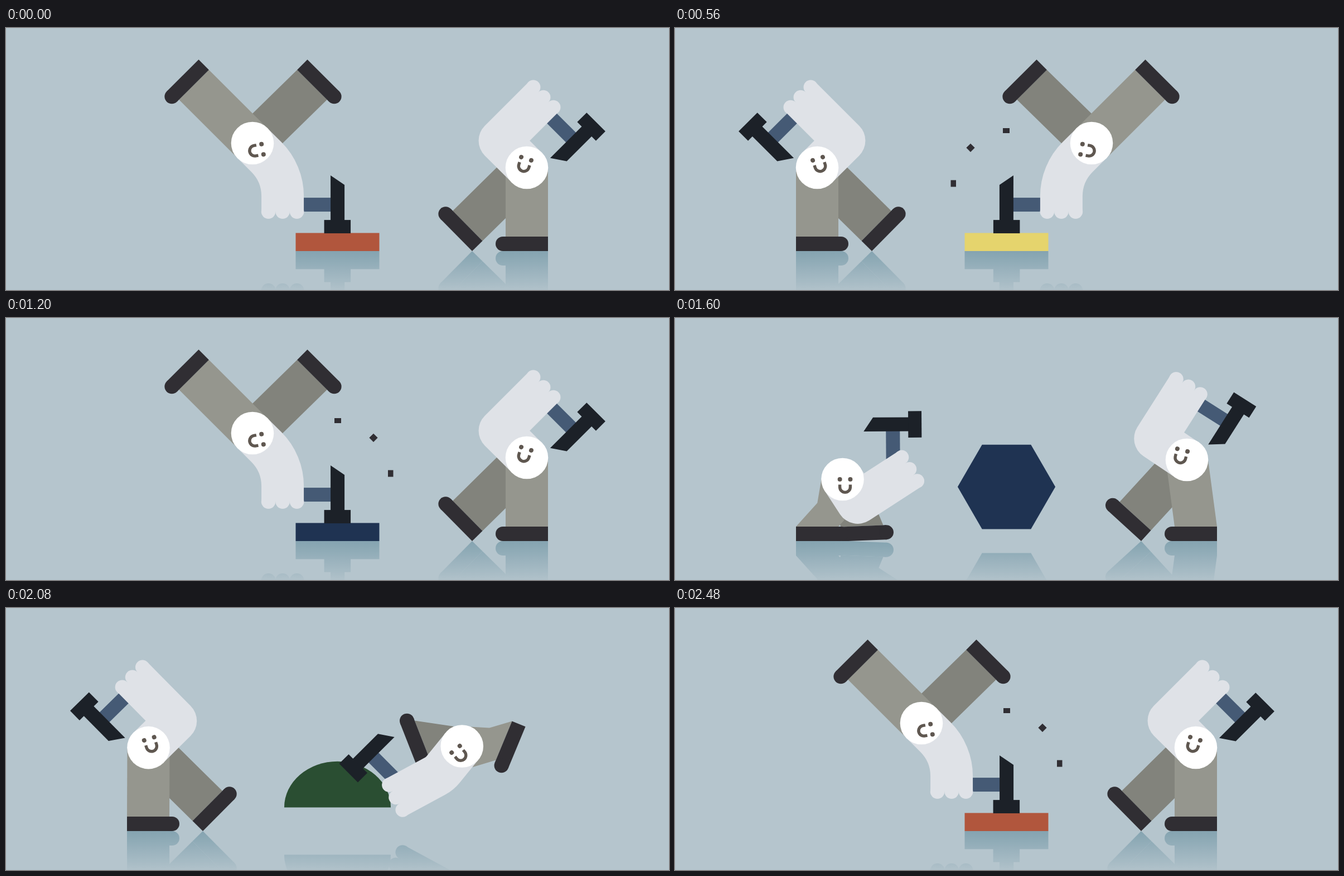
Recreate the animation shown at these times as an HTML page with a canvas. Size 1189 by 471 pixels, loop 2560 ms.

```html
<!DOCTYPE html>
<html>
<head>
<meta charset="utf-8">
<style>
html, body { margin: 0; width: 100%; height: 100%; overflow: hidden; background: #b5c5cd; }
canvas { display: block; }
</style>
</head>
<body>
<canvas id="stage" width="1189" height="471"></canvas>
<script>
const W = 1189, H = 471, FLOOR = 401, STEP = 80, FRAMES = 32;
const HALF = 38, SHOE_H = 26, HEEL = 353;
const BG = '#b5c5cd', SHOE = '#302e33', SKIN = '#dfe2e7', INK = '#5f5750';
const BLOCKS = ['#b1563d', '#e5d46d', '#1f3352', '#2a4e32'];

const ctx = document.getElementById('stage').getContext('2d');
const mirror = document.createElement('canvas');
mirror.width = W;
mirror.height = H;
const mctx = mirror.getContext('2d');
const fade = mctx.createLinearGradient(0, FLOOR, 0, 478);
fade.addColorStop(0, 'rgba(132,163,176,1)');
fade.addColorStop(1, 'rgba(132,163,176,0)');

const rad = d => d * Math.PI / 180;
const polar = (x, y, deg, r) => [x + r * Math.cos(rad(deg)), y + r * Math.sin(rad(deg))];
const lerp = (a, b, w) => a + (b - a) * w;

function mix(a, b, w) {
  const out = {};
  for (const k in a) out[k] = lerp(a[k], b[k], w);
  return out;
}

// Standing: front foot flat, back foot square to its leg and pivoting on its heel.
function stand(x, y, more) {
  const dx = x - HEEL, dy = y - FLOOR;
  const turn = Math.atan2(dy, dx) + Math.acos(HALF / Math.hypot(dx, dy));
  const c = Math.cos(turn), s = Math.sin(turn);
  return {
    x, y, frontX: 255, frontY: FLOOR - SHOE_H, front: 0,
    backX: HEEL + HALF * c + SHOE_H * s, backY: FLOOR + HALF * s - SHOE_H * c,
    back: turn * 180 / Math.PI, side: 1, knee: 0,
    upper: 68.5, fore: 110.5, round: 0, slip: -3.7, twist: 0, bend: -90, ...more
  };
}

const RAISED = stand(255, 251, { arm: -45, faceX: 1, faceY: -16, face: -18 });
const WINDUP = stand(271, 255, { arm: -34, bend: -88.4, faceX: 8, faceY: -17.5, face: -15 });
const CROUCH = stand(300.5, 290, {
  arm: 57, upper: 50, twist: 32.6, knee: 15.5, faceX: 4.5, faceY: 0, face: 0,
  backX: 335.5, backY: 374, back: -2.3
});
const HIT = stand(442, 207, {
  arm: 45, bend: 45, upper: 76.5, fore: 69, round: 99.5, slip: 0, faceX: 18, faceY: 11, face: 79,
  frontX: 337, frontY: 102, front: 135, backX: 549, backY: 102, back: -135, side: -1
});

function pose(p) {
  if (p < 4) return mix(HIT, CROUCH, p / 4);
  if (p < 8) return mix(CROUCH, RAISED, 1 - Math.pow((7 - Math.min(p, 7)) / 3, 9));
  if (p <= 12) return mix(RAISED, WINDUP, Math.pow((p - 8) / 4, 5));
  return mix(WINDUP, HIT, Math.min(1, Math.pow((p - 12) / 2.5, 1.8)));
}

function poly(g, pts) {
  g.beginPath();
  pts.forEach(([x, y]) => g.lineTo(x, y));
  g.fill();
}

function disc(g, x, y, r) {
  g.beginPath();
  g.arc(x, y, r, 0, 7);
  g.fill();
}

// Runs draw in a moved and turned frame.
function at(g, x, y, deg, draw) {
  g.save();
  g.translate(x, y);
  g.rotate(rad(deg));
  draw();
  g.restore();
}

function leg(g, fill, x, y, ax, ay, foot, side, knee) {
  const [vx, vy] = polar(0, 0, foot, HALF), k = knee / HALF;
  const joints = [[x, y], [(x + ax) / 2 + vx * k, (y + ay) / 2 + vy * k], [ax, ay]];
  const edge = s => joints.map(([jx, jy]) => [jx + s * vx, jy + s * vy]);
  g.fillStyle = fill;
  poly(g, [...edge(-1), ...edge(1).reverse()]);
  at(g, ax, ay, foot, () => {
    g.scale(side < 0 ? -1 : 1, 1);
    g.fillStyle = SHOE;
    g.fillRect(-HALF, 0, 81, SHOE_H);
    disc(g, 43, 13, 13);
  });
}

function hammer(g, slip, twist) {
  const gripX = -20, gripY = -31;
  at(g, slip + gripX, gripY, twist, () => {
    g.translate(-gripX, -gripY);
    g.fillStyle = '#455a75';
    g.fillRect(-25, -87, 25, 87);
    g.fillStyle = '#1c2128';
    poly(g, [[-65, -86], [16, -86], [16, -111], [-48, -111]]);
    g.fillRect(15, -122, 24, 47.5);
  });
}

function face(g, x, y, turn) {
  at(g, x, y, turn, () => {
    g.fillStyle = g.strokeStyle = INK;
    disc(g, -9.4, 0, 4);
    disc(g, 9.4, 0, 4);
    g.lineWidth = 5.4;
    g.beginPath();
    g.moveTo(-9.4, 9.5);
    g.arc(0, 14, 9.4, Math.PI, 0, true);
    g.lineTo(9.4, 9.5);
    g.stroke();
  });
}

function figure(g, p) {
  const q = pose(p), { x, y } = q, hand = q.arm + q.bend;
  const [ex, ey] = polar(x, y, q.arm, q.upper);
  const [px, py] = polar(ex, ey, hand, q.fore);
  const slack = Math.min(q.upper, q.fore) / (Math.abs(Math.tan(rad(q.bend) / 2)) || 0.01);

  leg(g, '#82837c', x, y, q.backX, q.backY, q.back, q.side, 0);
  leg(g, '#95968e', x, y, q.frontX, q.frontY, q.front, 1, q.knee);

  at(g, px, py, hand, () => {
    hammer(g, q.slip, q.twist);
    g.fillStyle = SKIN;
    for (const f of [-25.5, 0, 25.5]) disc(g, 0, f, 12.8);
  });
  g.strokeStyle = SKIN;
  g.lineWidth = 2 * HALF;
  g.lineJoin = 'round';
  g.beginPath();
  g.moveTo(x, y);
  g.arcTo(ex, ey, px, py, Math.min(q.round, slack));
  g.lineTo(px, py);
  g.stroke();

  g.fillStyle = '#fff';
  disc(g, x, y, 38.3);
  face(g, x + q.faceX, y + q.faceY, q.face);
}

const ngon = (n, r, turn) =>
  Array.from({ length: n }, (_, i) => polar(0, 0, turn + i * 360 / n, r));

function toy(g, kind) {
  if (kind === 0) disc(g, 0, 0, 76);
  if (kind === 1) at(g, 0, 25, 0, () => poly(g, ngon(3, 101, -90)));
  if (kind === 2) poly(g, ngon(6, 87.6, 0));
  if (kind === 3) {
    g.beginPath();
    g.arc(0, 49, 98.5, Math.PI, 0);
    g.fill();
  }
}

// A struck slab springs up into a toy, then is flattened again.
function block(g, n) {
  const f = (n + 1) % 8, kind = Math.floor((n + 1) / 8) % 4;
  g.fillStyle = BLOCKS[kind];
  if (f < 2) return g.fillRect(519.5, 368.5, 150, 33);
  const size = Math.min(1, (f - 1) / 2.5, (8 - f) / 2);
  const tall = lerp(0.2, 1, size), wide = lerp(0.85, 1, size);
  const rise = 83.7 * (1 - Math.pow((f - 4.5) / 3.5, 2));
  at(g, W / 2, Math.min(385.6 - rise, FLOOR - 76 * tall), 0, () => {
    g.scale(wide, tall);
    toy(g, kind);
  });
}

function chips(g) {
  g.fillStyle = SHOE;
  g.fillRect(589, 180, 12, 9);
  g.fillRect(685, 273.5, 9.5, 12);
  at(g, 659, 215.3, 45, () => g.fillRect(-5.4, -5.4, 10.8, 10.8));
}

function flip(g, draw) {
  g.save();
  g.translate(W, 0);
  g.scale(-1, 1);
  draw();
  g.restore();
}

function scene(g, n) {
  block(g, n);
  figure(g, n % 16);
  flip(g, () => figure(g, (n + 8) % 16));
  if (n % 16 === 15) chips(g);
  if (n % 16 === 7) flip(g, () => chips(g));
}

function render(n) {
  ctx.fillStyle = BG;
  ctx.fillRect(0, 0, W, H);
  scene(ctx, n);
  ctx.fillStyle = BG;
  ctx.fillRect(0, FLOOR, W, H - FLOOR);

  mctx.clearRect(0, 0, W, H);
  mctx.save();
  mctx.translate(0, 2 * FLOOR);
  mctx.scale(1, -1);
  scene(mctx, n);
  mctx.restore();
  mctx.globalCompositeOperation = 'source-in';
  mctx.fillStyle = fade;
  mctx.fillRect(0, 0, W, H);
  mctx.globalCompositeOperation = 'source-over';
  ctx.drawImage(mirror, 0, FLOOR, W, H - FLOOR, 0, FLOOR, W, H - FLOOR);
}

const start = performance.now();
function tick() {
  render(Math.floor((performance.now() - start) / STEP) % FRAMES);
  requestAnimationFrame(tick);
}
tick();
</script>
</body>
</html>
```
